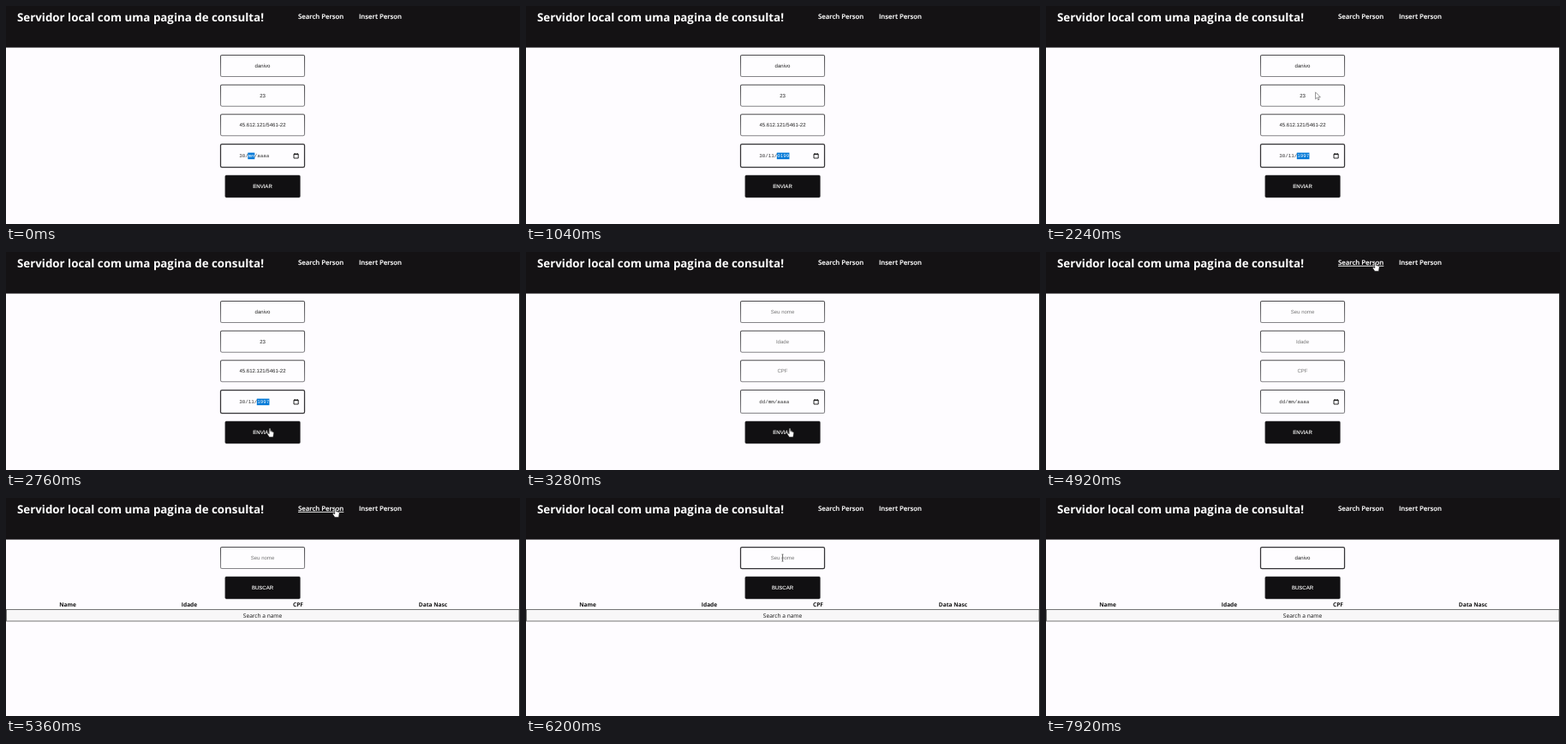
Write an HTML page that moves like this. It is 600 by 255 pixels and loops after 8 s.

```html
<!DOCTYPE html>
<html lang="pt">
<head>
<meta charset="utf-8">
<title>Servidor local</title>
<style>
  html, body { margin: 0; width: 100%; height: 100%; overflow: hidden; background: #fefcff; }
  svg { display: block; width: 600px; height: 255px; text-rendering: geometricPrecision; }
  .ui { font-family: "Open Sans", "Noto Sans", sans-serif; }
  .field { font: 6.05px "Liberation Sans", Arial, sans-serif; text-anchor: middle; }
  .action { fill: #fff; stroke: #fff; stroke-width: .12; }
  .mono { font: 5.8px "Liberation Mono", "DejaVu Sans Mono", monospace; white-space: pre; }
  .link { font-size: 7.77px; font-weight: 600; fill: #fff; stroke: #fff; stroke-width: .15; }
  .cell { font-size: 6.6px; text-anchor: middle; fill: #111; }
  .head { font-weight: 700; }
</style>
</head>
<body>
<svg viewBox="0 0 600 255">
  <defs>
    <linearGradient id="inset" x1="0" y1="0" x2="0" y2="1">
      <stop offset="0" stop-color="#4c4b4e"/>
      <stop offset="1" stop-color="#858488"/>
    </linearGradient>
  </defs>
  <rect width="600" height="255" fill="#fefcff"/>
  <rect width="600" height="48.6" fill="#141214"/>
  <rect x="599" y="48" width="1" height="207" fill="#222"/>
  <g class="ui">
    <text x="13" y="18" font-size="13.33" font-weight="700" fill="#fff">Servidor local com uma pagina de consulta!</text>
    <text id="search" class="link" x="341" y="15">Search Person</text>
    <text class="link" x="412" y="15">Insert Person</text>
  </g>
  <g id="insertPage"></g>
  <g id="searchPage"></g>
  <path id="caret" stroke="#222" stroke-width=".8"/>
  <g id="cursor" stroke-linejoin="round">
    <path id="arrow" d="M0 0V8L1.9 6.3 3.2 9.1 4.5 8.5 3.3 5.8H5.8Z" fill="#fff" stroke="#6c6a6e" stroke-width=".7"/>
    <path id="hand" d="M-.8 .6Q0-.5 .8 .6V3.6L4 4.5Q4.8 4.9 4.6 6L3.8 10.6H-.6L-3.2 6.8Q-3 5.5-1.8 6L-.8 6.8Z" fill="#fff" stroke="#222" stroke-width=".6"/>
    <path id="beam" d="M-1 0H1M0 0V8M-1 8H1" fill="none" stroke="#555" stroke-width=".8"/>
  </g>
</svg>
<script>
const LOOP = 8000;
const NAME = "danivo";
const MID = 299.5;
const $ = id => document.getElementById(id);

function add(parent, tag, attrs, text = "") {
  const node = document.createElementNS("http://www.w3.org/2000/svg", tag);
  for (const key in attrs) node.setAttribute(key, attrs[key]);
  node.textContent = text;
  return parent.appendChild(node);
}

function addInput(page, y, height, placeholder) {
  const box = add(page, "rect", { x: 250.5, y: y + .5, width: 98, height: height - 1, rx: 1.6, fill: "#fefdff" });
  const label = add(page, "text", { class: "field", x: MID, y: y + 15.1 });
  return {
    label,
    show(value, focused) {
      label.textContent = value || placeholder;
      label.setAttribute("fill", value ? "#222" : "#777");
      box.setAttribute("stroke", focused ? "#333235" : "url(#inset)");
      box.setAttribute("stroke-width", focused ? 1.25 : 1.1);
    }
  };
}

function addButton(page, y, text) {
  add(page, "rect", { x: 255.8, y, width: 87.6, height: 26, rx: 1.4, fill: "#111012", stroke: "#4a494c", "stroke-width": .5 });
  add(page, "text", { class: "field action", x: MID, y: y + 15.1 }, text);
}

// Insert page
const form = $("insertPage");
const [nameInput, ageInput, cpfInput, dateInput] = [
  addInput(form, 57, 26, "Seu nome"),
  addInput(form, 91.7, 26, "Idade"),
  addInput(form, 126.2, 26, "CPF"),
  addInput(form, 161, 28, "")
];
addButton(form, 198, "ENVIAR");
const highlight = add(form, "rect", { y: 171.6, height: 7.6, fill: "#0078d7" });
const dateParts = [272.3, 282.8, 293.3].map(x => add(form, "text", { class: "mono", x, y: 177.4 }));
for (const x of [279.3, 289.8]) add(form, "text", { class: "mono", x, y: 177.4, fill: "#333" }, "/");
add(form, "path", { d: "M336 173.2H341.2V178H336ZM336 173.6H341.2M337.2 172V173M340 172V173", fill: "none", stroke: "#111", "stroke-width": .9 });

// Search page
const results = $("searchPage");
results.setAttribute("class", "ui");
const query = addInput(results, 57, 26, "Seu nome");
addButton(results, 92, "BUSCAR");
for (const [text, x] of [["Name", 72], ["Idade", 214], ["CPF", 341], ["Data Nasc", 498.5]])
  add(results, "text", { class: "cell head", x, y: 127 }, text);
add(results, "rect", { x: .5, y: 130.5, width: 598.5, height: 13.5, fill: "#f8f7f8", stroke: "#666", "stroke-width": .9 });
add(results, "text", { class: "cell", x: MID, y: 140 }, "Search a name");

// [start, day, month, year, highlighted part]
const dateSteps = [
  [0, "30", "mm", "aaaa", 1],
  [320, "30", "01", "aaaa", 1],
  [520, "30", "11", "aaaa", 2],
  [720, "30", "11", "0001", 2],
  [880, "30", "11", "0019", 2],
  [1040, "30", "11", "0199", 2],
  [1240, "30", "11", "1997", 2],
  [3080, "30", "11", "1997", -1],
  [3280, "dd", "mm", "aaaa", -1]
];

// [time, x, y] of the pointer tip
const route = [
  [2240, 314.5, 100.8], [2480, 317, 150], [2720, 308, 206], [3800, 308, 206],
  [4160, 318, 180], [4560, 346, 100], [4880, 384.5, 12], [5520, 384.5, 12],
  [5720, 350, 36], [5960, 299.5, 66]
];

function pointerAt(t) {
  const next = route.findIndex(point => point[0] > t);
  if (next < 0) return route[route.length - 1].slice(1);
  const [a, b] = [route[next - 1] || route[0], route[next]];
  const k = b === a ? 0 : (t - a[0]) / (b[0] - a[0]);
  return [a[1] + (b[1] - a[1]) * k, a[2] + (b[2] - a[2]) * k];
}

const visible = (node, on) => node.setAttribute("display", on ? "inline" : "none");
const inside = (x, y, left, top, right, bottom) => x >= left && x <= right && y >= top && y <= bottom;

function drawDate(t) {
  const [, ...step] = dateSteps.filter(s => s[0] <= t).pop();
  const active = step[3];
  dateParts.forEach((part, i) => {
    part.textContent = step[i];
    part.setAttribute("fill", i === active ? "#fff" : "#333");
  });
  visible(highlight, active >= 0);
  highlight.setAttribute("x", active === 1 ? 282.3 : 292.8);
  highlight.setAttribute("width", active === 1 ? 8 : 14.6);
}

function drawPointer(t, searching) {
  const [x, y] = pointerAt(t);
  const onLink = inside(x, y, 341, 6, 395, 20);
  const onButton = !searching && inside(x, y, 256, 198, 343, 224);
  const onText = searching && inside(x, y, 250, 57, 349, 83);
  visible($("cursor"), t >= 2240 && t < 6760);
  $("cursor").setAttribute("transform", `translate(${x} ${y})`);
  visible($("hand"), onLink || onButton);
  visible($("beam"), onText);
  visible($("arrow"), !onLink && !onButton && !onText);
  $("search").setAttribute("text-decoration", onLink ? "underline" : "none");
}

function draw(time) {
  const t = Math.floor(time % LOOP / 40) * 40;
  const searching = t >= 5360;
  const filled = t < 3280;
  visible(form, !searching);
  visible(results, searching);

  nameInput.show(filled && NAME, false);
  ageInput.show(filled && "23", false);
  cpfInput.show(filled && "45.612.121/5461-22", false);
  dateInput.show("", t < 3080);
  drawDate(t);

  const typed = NAME.slice(0, Math.max(0, Math.floor((t - 6760) / 120) + 1));
  query.show(typed, t >= 6200);
  visible($("caret"), t >= 6760 && t < 7920);
  if (typed) {
    const x = MID + query.label.getComputedTextLength() / 2 + .5;
    $("caret").setAttribute("d", `M${x} 66V74`);
  }
  drawPointer(t, searching);
}

const start = performance.now();
function tick() {
  draw(performance.now() - start);
  requestAnimationFrame(tick);
}
tick();
</script>
</body>
</html>
```
